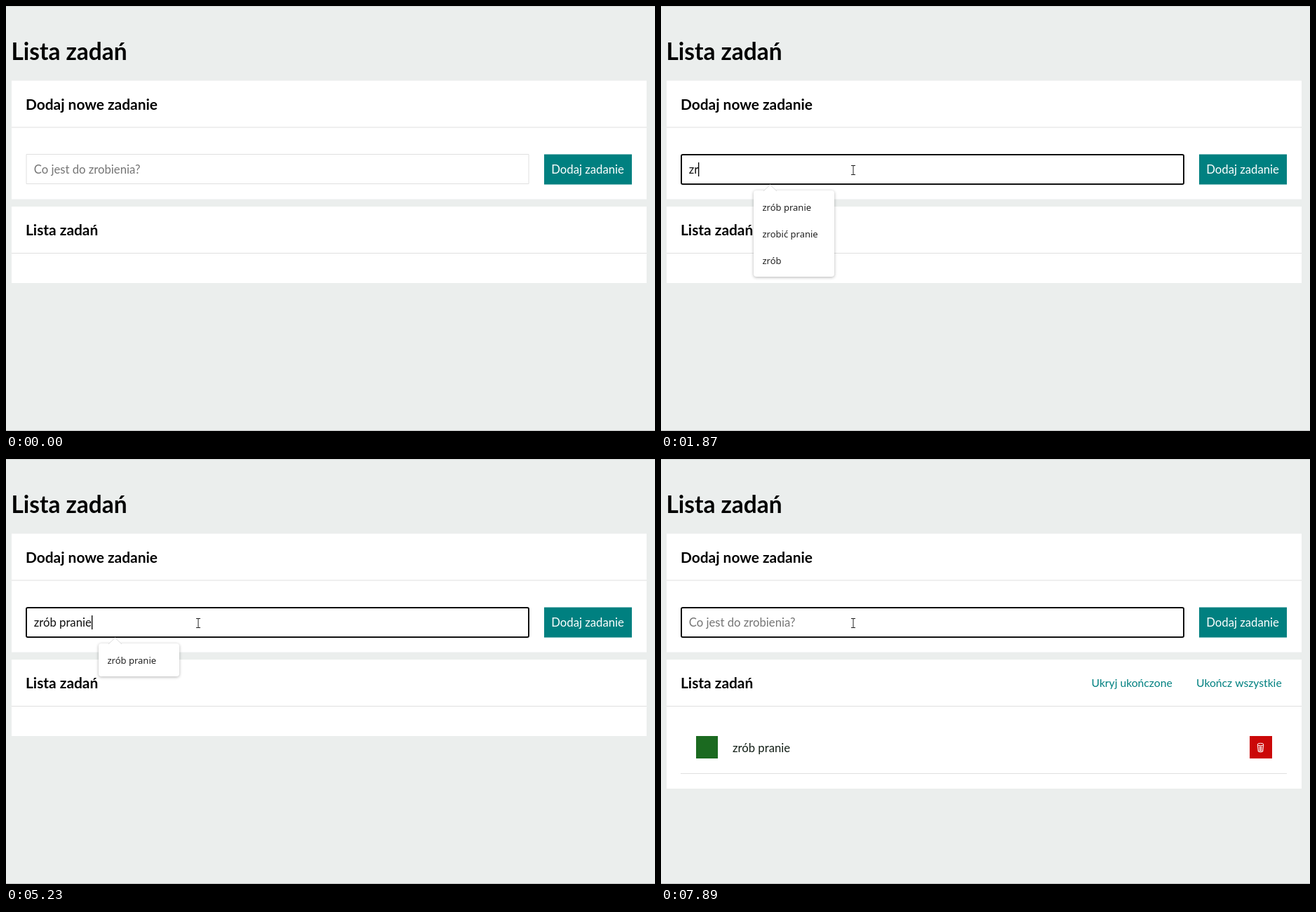
Write an HTML page with a canvas that moves like this. It is 925 px wide and 606 px high and loops after 8000 ms.

```html
<!DOCTYPE html>
<html lang="pl">
<head>
<meta charset="utf-8">
<title>Lista zadań</title>
<style>
html, body { margin: 0; width: 100%; height: 100%; overflow: hidden; }
canvas { display: block; }
</style>
</head>
<body>
<canvas id="stage" width="925" height="606"></canvas>
<script>
const ctx = document.getElementById('stage').getContext('2d');
const LOOP = 8000, TEAL = '#008080', LINE = '#e0e0e0';
const TASK = 'zrób pranie', SUBMIT = 5880;
const KEY_TIMES = [1590, 1870, 2300, 2730, 2820, 3160, 3530, 3660, 4150, 4370, 5230];
const HINTS = ['zadanie', 'zrób pranie', 'zrobić pranie', 'zrób'];

const clamp = v => Math.max(0, Math.min(1, v));
const between = (t, a, b) => t >= a && t < b;

function rect(x, y, w, h, color) {
  ctx.fillStyle = color;
  ctx.fillRect(x, y, w, h);
}

function text(str, x, y, size, color = '#000', weight = 400, family = 'Lato') {
  ctx.font = `${weight} ${size}px ${family}, sans-serif`;
  ctx.fillStyle = color;
  ctx.fillText(str, x, y);
  return ctx.measureText(str).width;
}

function card(y, h, title) {
  rect(8, y, 905, h, '#fff');
  rect(8, y + 66, 905, 1, LINE);
  text(title, 28, y + 41, 20.9, '#000', 700);
}

function drawInput(t) {
  const focused = t >= 1220;
  const typed = t < SUBMIT ? TASK.slice(0, KEY_TIMES.filter(k => t >= k).length) : '';
  ctx.beginPath();
  if (focused) ctx.roundRect(29, 212, 716, 42, 2);
  else ctx.rect(29, 211.5, 716, 42);
  ctx.lineWidth = focused ? 2 : 1;
  ctx.strokeStyle = focused ? '#101010' : LINE;
  ctx.stroke();
  const width = text(typed || 'Co jest do zrobienia?', 39.7, 239, 16.7, typed ? '#111' : '#757575');
  const caretOn = between(t, 1220, 4950) || between(t, 5230, 5820) ||
    between(t, 6380, 6880) || between(t, 7390, 7890);
  if (caretOn) rect(Math.round(39.7 + (typed ? width : 0)), 223, 1.3, 20, '#000');
}

function drawHints(t) {
  if (!between(t, 1310, 5450)) return;
  const rows = t < 1870 ? HINTS : t < 2300 ? HINTS.slice(1) :
    t < 2820 ? [HINTS[1], HINTS[3]] : [HINTS[1]];
  const shrinking = between(t, 2820, 2940);
  const bottom = shrinking ? (t < 2880 ? 348 : 316) : 272 + 38 * rows.length;
  ctx.save();
  ctx.globalAlpha = 1 - clamp((t - 5230) / 220);
  ctx.shadowColor = 'rgba(0,0,0,.3)';
  ctx.shadowBlur = 4;
  ctx.shadowOffsetY = 1;
  ctx.fillStyle = '#fff';
  ctx.beginPath();
  ctx.roundRect(132, 263, 115, bottom - 263, shrinking ? [4, 4, 0, 0] : 4);
  ctx.fill();
  ctx.shadowColor = 'transparent';
  ctx.beginPath();
  ctx.moveTo(146, 264);
  ctx.lineTo(155.5, 255);
  ctx.lineTo(165, 264);
  ctx.fill();
  ctx.strokeStyle = '#ddd';
  ctx.lineWidth = 1;
  ctx.stroke();
  rows.forEach((row, i) => text(row, 144.5, 291.5 + 38 * i, 13, '#222', 400, '"Noto Sans"'));
  ctx.restore();
}

function drawTask() {
  text('Ukryj ukończone', 613.5, 325, 15.7, TEAL);
  text('Ukończ wszystkie', 763, 325, 15.7, TEAL);
  rect(50, 395, 31, 32, '#1b6a20');
  text(TASK, 102, 418, 16.7, '#142018');
  rect(839, 395, 32, 32, '#cb0808');
  rect(28, 448, 864, 1, LINE);
  // Trash can
  ctx.strokeStyle = '#fff';
  ctx.lineWidth = 1;
  ctx.beginPath();
  ctx.ellipse(854.5, 407, 4.5, 1.7, 0, 0, 7);
  ctx.moveTo(850.3, 408);
  ctx.lineTo(851.2, 417);
  ctx.quadraticCurveTo(854.5, 419, 857.8, 417);
  ctx.lineTo(858.7, 408);
  for (const x of [852.8, 854.5, 856.2]) {
    ctx.moveTo(x, 409.5);
    ctx.lineTo(x, 417);
  }
  ctx.stroke();
}

function drawPointer(t) {
  if (t < 150) return;
  const p = clamp((t - 150) / 790), ease = p * p * (3 - 2 * p);
  const x = 791 + (274 - 791) * ease;
  const y = 594 + (234 - 594) * ease + (between(t, 1010, 1370) ? 1 : 0);
  if (between(t, 1220, 1370)) {
    ctx.fillStyle = '#ffff80';
    ctx.beginPath();
    ctx.arc(272, 234.5, 12.5, 0, 7);
    ctx.fill();
  }
  ctx.lineWidth = 1;
  ctx.beginPath();
  if (x < 745 && y < 254) {
    ctx.strokeStyle = '#222';
    for (const s of [-1, 1]) {
      ctx.moveTo(x - 3, y + s * 6.5);
      ctx.lineTo(x + 3, y + s * 6.5);
    }
    ctx.moveTo(x, y - 6.5);
    ctx.lineTo(x, y + 6.5);
    ctx.stroke();
    return;
  }
  const arrow = [0, 0, 0, 16, 4, 12.5, 6.5, 18, 9, 17, 6.5, 11.5, 11.5, 11.5];
  for (let i = 0; i < arrow.length; i += 2) ctx.lineTo(x + arrow[i], y + arrow[i + 1]);
  ctx.closePath();
  ctx.fillStyle = '#fff';
  ctx.fill();
  ctx.strokeStyle = '#000';
  ctx.stroke();
}

function draw(t) {
  const added = t >= SUBMIT;
  rect(0, 0, 925, 606, '#ebeeed');
  rect(0, 0, 925, 1, '#d5d7d6');
  rect(0, 605, 925, 1, '#bfc1c0');
  text('Lista zadań', 7.5, 77, 33.4, '#000', 700);
  card(106.5, 169, 'Dodaj nowe zadanie');
  card(286, added ? 184 : 109, 'Lista zadań');
  rect(767, 211.5, 125, 43, TEAL);
  text('Dodaj zadanie', 777.3, 239, 16.7, '#fff');
  drawInput(t);
  if (added) drawTask();
  drawHints(t);
  drawPointer(t);
}

function tick() {
  draw(performance.now() % LOOP);
  requestAnimationFrame(tick);
}
tick();
</script>
</body>
</html>
```
